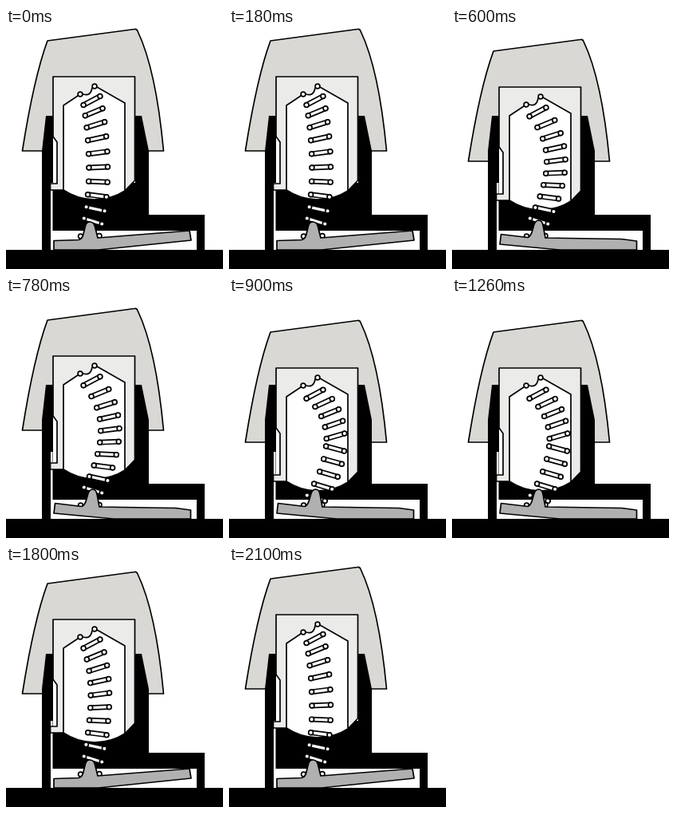
An HTML page that plays this animation: 272 px wide and 302 px high, repeating every 2400 ms.

```html
<!DOCTYPE html>
<html lang="en">
<head>
<meta charset="utf-8">
<title>Buckling spring key</title>
<style>
  html, body { margin: 0; width: 100%; height: 100%; overflow: hidden; background: #fff; }
  svg { display: block; width: 272px; height: 302px; }
  .line { stroke: #000; stroke-width: 1.7; stroke-linejoin: round; }
</style>
</head>
<body>
<svg viewBox="0 0 272 302">
  <g class="key">
    <path class="line" fill="#d9d8d4" d="M52 16L161 1.5Q164 1 165 4Q188 52 197.500 154H20.500Q35 62 52 16Z"/>
  </g>

  <!-- housing, with the recess and the lower chamber cut out -->
  <path d="M50 110H59V194H162V110H170L179 154V234H249V280H45V154Z"/>
  <path fill="#fff" d="M56 194H58.500V254H239V279H56Z"/>

  <g class="key">
    <path fill="#fff" d="M59 136H64V195H56V194H59Z"/>
    <path class="line" fill="#ebebe9" d="M59 61H161.500V191L149 204L72 203H55.500V195H64V143L59 136Z"/>
    <path class="line" fill="#fff" d="M72 97L90 85Q93 81 97 83Q106 86 108 75L114 74L149 94V204Q132 215 111 215Q90 215 72 203Z"/>
  </g>

  <g id="spring"></g>
  <path id="hammer" class="line" fill="#b0b0b0"/>
  <rect y="278" width="272" height="24"/>
</svg>
<script>
const STEP = 300;
const ORDER = [0, 1, 2, 3, 3, 2, 1, 0];
const COILS = 10;
const COIL_WIDTH = 23.5;

const UP = 'M60 266.5L91 265.5Q96 264 97 258L99.500 248Q101 243 105 243Q110 243 111.500 249L115 263L230 254L232 266L116 278H60Z';
const DOWN = 'M61.500 258.500L95 262.500Q99 261 101 253L103 246Q105 241 109 241Q113 241.500 114 247L117 263L213 264.500L231.500 267V278H135L60 271Z';

// bend: the two handles of the spring's centre line; fold: how sharply it kinks.
const POSES = [
  { drop: 0, hammer: UP, bend: [[116, 131], [120, 199]], foot: 242, fold: 0 },
  { drop: 6, hammer: UP, bend: [[124, 141], [118, 196]], foot: 242, fold: 0 },
  { drop: 13, hammer: DOWN, bend: [[144, 149], [131, 199]], foot: 242, fold: 0 },
  { drop: 28, hammer: DOWN, bend: [[146, 151], [138, 210]], foot: 252, fold: 16 }
];

const spring = document.getElementById('spring');
const hammer = document.getElementById('hammer');
const keys = document.querySelectorAll('.key');

const bezier = (a, b, c, d, u) => {
  const v = 1 - u;
  return a * v ** 3 + 3 * b * v * v * u + 3 * c * v * u * u + d * u ** 3;
};

const ring = (x, y) =>
  `<circle class="line" fill="#fff" cx="${x}" cy="${y}" r="2.9"/>`;

// Coils tip from rising to falling along the spring; a fold splits the two halves.
const tilt = (u, fold) => 18 * u - 11 + fold * (u < 0.5 ? -u / 2 : 1 - u);

function coil({ drop, bend: [p, q], foot, fold }, u) {
  const dy = tilt(u, fold);
  const dx = Math.sqrt(COIL_WIDTH ** 2 - dy ** 2);
  const x = bezier(107.5, p[0], q[0], 109, u) - dx / 2;
  const y = bezier(91 + drop * 1.1, p[1], q[1], foot, u) - dy / 2;
  const rod = `d="M${x} ${y}l${dx} ${dy}" stroke-linecap="round"`;
  return `<path ${rod} stroke="#000" stroke-width="6.8"/>` +
    `<path ${rod} stroke="#fff" stroke-width="3.4"/>` +
    ring(x, y) + ring(x + dx, y + dy);
}

function pose(p) {
  keys.forEach(k => k.setAttribute('transform', `translate(0 ${p.drop})`));
  hammer.setAttribute('d', p.hammer);
  let parts = ring(93, 83 + p.drop) + ring(111, 73 + p.drop);
  for (let i = 0; i < COILS; i++) parts += coil(p, i / (COILS - 1));
  spring.innerHTML = parts + ring(93.5, 261) + ring(117, 260.5);
}

let shown = -1;
function tick() {
  const now = ORDER[Math.floor(performance.now() / STEP) % ORDER.length];
  if (now !== shown) pose(POSES[shown = now]);
  requestAnimationFrame(tick);
}
tick();
</script>
</body>
</html>
```
